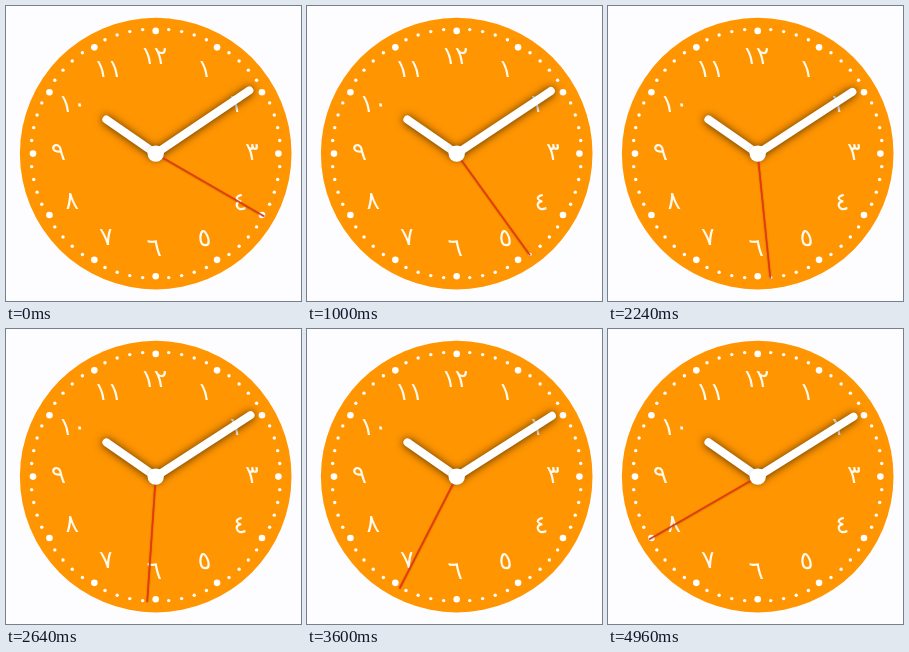
An HTML page with a canvas that plays this animation: 295 by 295 pixels, repeating every 5 s.

```html
<!DOCTYPE html>
<html lang="ar">
<head>
<meta charset="utf-8">
<title>Clock</title>
<style>
  html, body { margin: 0; width: 100%; height: 100%; overflow: hidden; background: #fdfcff; }
  canvas { display: block; width: 295px; height: 295px; }
</style>
</head>
<body>
<canvas id="stage" width="295" height="295"></canvas>
<script>
const ctx = document.getElementById('stage').getContext('2d');
const CENTER = { x: 149.7, y: 147.6 };
const STEP = 40, STEPS = 125;
const START_SECOND = 20, SWEEP_SECONDS = 20;
const MINUTE = 9, HOUR = 10;
const FACE = '#ff9500', INK = '#fffaf0';
const NUMERAL_SLANT = 0.15;

// Visual centres of the numerals, from one to twelve.
const NUMERAL_SPOTS = [
  [198, 63], [232, 98], [246.5, 146], [234, 195], [198, 231], [148.5, 242],
  [100.5, 230.5], [65, 195], [52.5, 146], [66, 98], [101.5, 63], [150, 49.5]
];

const arabic = n => String(n).replace(/\d/g, d => String.fromCharCode(0x660 + Number(d)));

function polar(turn, radius) {
  const a = turn * 2 * Math.PI;
  return [CENTER.x + radius * Math.sin(a), CENTER.y - radius * Math.cos(a)];
}

function disc(x, y, radius, color) {
  ctx.fillStyle = color;
  ctx.beginPath();
  ctx.arc(x, y, radius, 0, 2 * Math.PI);
  ctx.fill();
}

function drawNumeral(text, x, y) {
  const m = ctx.measureText(text);
  const dx = (m.actualBoundingBoxLeft - m.actualBoundingBoxRight) / 2;
  const dy = (m.actualBoundingBoxAscent - m.actualBoundingBoxDescent) / 2;
  ctx.save();
  ctx.transform(1, 0, NUMERAL_SLANT, 1, x, y);
  ctx.fillText(text, dx, dy);
  ctx.restore();
}

function drawFace() {
  ctx.fillStyle = '#fdfcff';
  ctx.fillRect(0, 0, 295, 295);
  disc(CENTER.x, CENTER.y, 135.8, FACE);
  for (let i = 0; i < 60; i++) {
    const isHour = i % 5 === 0;
    disc(...polar(i / 60, isHour ? 122.7 : 124.7), isHour ? 3.3 : 1.7, '#fff');
  }
  ctx.fillStyle = INK;
  ctx.font = '25px "DejaVu Sans", sans-serif';
  ctx.direction = 'ltr';
  ctx.textAlign = 'left';
  ctx.textBaseline = 'alphabetic';
  NUMERAL_SPOTS.forEach(([x, y], i) => drawNumeral(arabic(i + 1), x, y));
}

function drawHand(turn, length, width, color, shadow) {
  ctx.save();
  ctx.shadowColor = `rgba(0, 0, 0, ${shadow})`;
  ctx.shadowBlur = width;
  ctx.shadowOffsetY = 0.5;
  ctx.strokeStyle = color;
  ctx.lineWidth = width;
  ctx.lineCap = width > 2 ? 'round' : 'butt';
  ctx.beginPath();
  ctx.moveTo(CENTER.x, CENTER.y);
  ctx.lineTo(...polar(turn, length));
  ctx.stroke();
  ctx.restore();
}

function draw(time) {
  const step = Math.floor(time / STEP) % STEPS;
  const second = START_SECOND + SWEEP_SECONDS * step / (STEPS - 1);
  const minute = MINUTE + second / 60;
  const hour = HOUR + minute / 60;

  drawFace();
  drawHand(hour / 12, 60, 8, '#fff', 0.7);
  drawHand(minute / 60, 113, 8, '#fff', 0.7);
  drawHand(second / 60, 125.5, 1.6, '#ec3414', 0.4);
  disc(CENTER.x, CENTER.y, 8.2, '#fff');
}

const start = performance.now();
function tick() {
  draw(performance.now() - start);
  requestAnimationFrame(tick);
}
tick();
</script>
</body>
</html>
```
